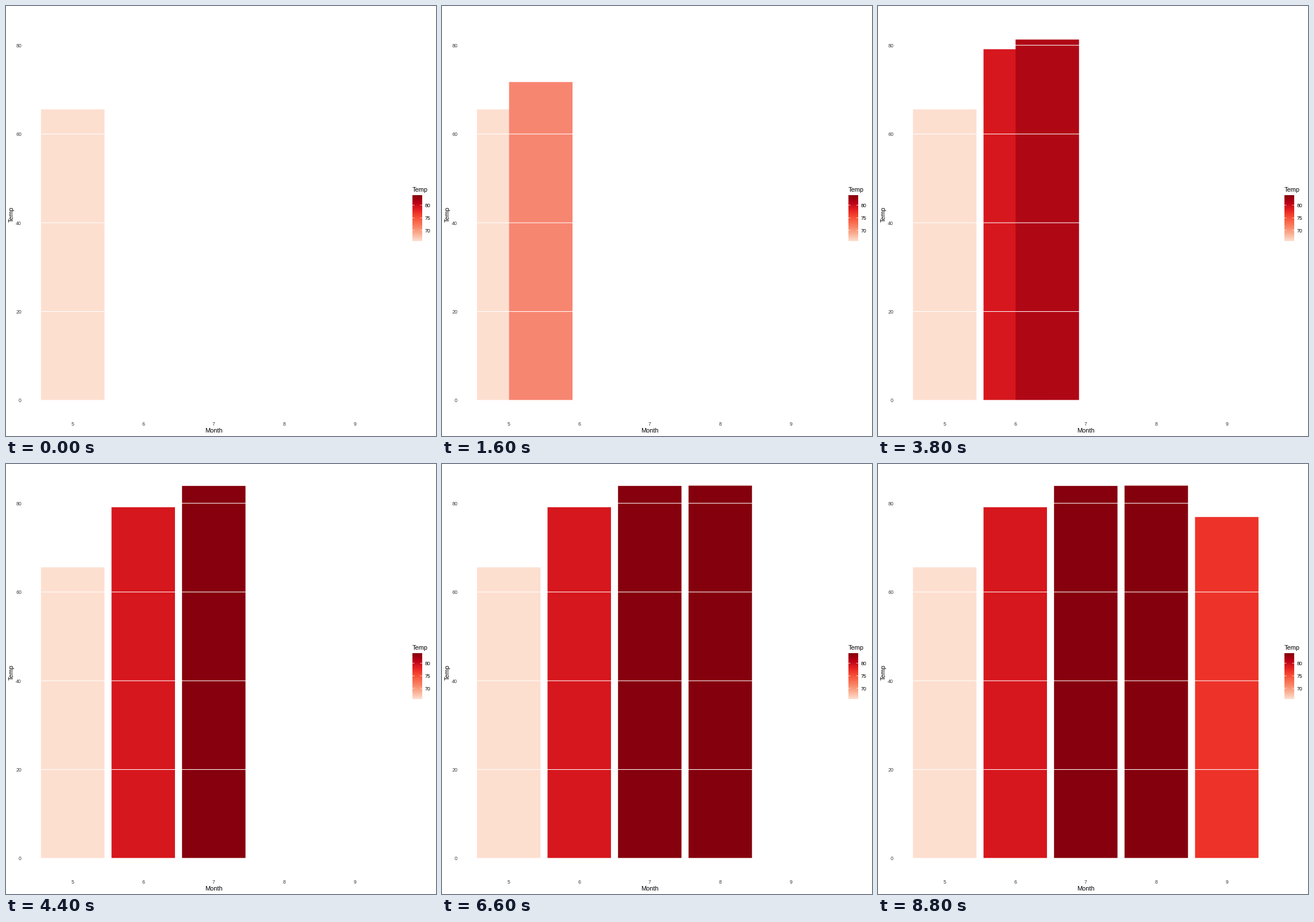
Animation of 748 by 748 pixels, one loop 10000 ms. Source, as a matplotlib script:

```python
import numpy as np
import matplotlib.pyplot as plt
from matplotlib.animation import FuncAnimation
from matplotlib.patches import Rectangle

SIZE, DPI = 748, 88
PX = 72 / DPI                       # one pixel in points
Y0, Y_UNIT = 685.9, 7.7205          # chart zero line and pixels per degree
X0, X_STEP = 116.1, 122.65          # centre of the first bar and spacing
BAR_W = 0.9 * X_STEP
MOVE, CYCLE = 11, 22                # frames per move, frames per month

months = [5, 6, 7, 8, 9]
temps = np.array([65.548, 79.1, 83.903, 83.968, 76.9])
low, high = temps.min(), temps.max()

REDS = ["fee5d9", "fcbba1", "fc9272", "fb6a4a", "ef3b2c", "cb181d", "99000d"]


# ---- colour: ramp blended in Lab, shown in a gamma 1.8 display space ----

def primaries(*xy):
    """RGB to XYZ matrix for three chromaticities and a D65 white."""
    m = np.array([[x / y, 1, (1 - x - y) / y] for x, y in xy]).T
    return m * np.linalg.solve(m, WHITE)


WHITE = np.array([0.9505, 1.0, 1.089])
SRGB = primaries((0.64, 0.33), (0.30, 0.60), (0.15, 0.06))
DISPLAY = primaries((0.63, 0.34), (0.295, 0.605), (0.155, 0.077))


def hex_to_lab(code):
    c = np.array([int(code[i:i + 2], 16) for i in (0, 2, 4)]) / 255
    lin = np.where(c > 0.04045, ((c + 0.055) / 1.055) ** 2.4, c / 12.92)
    t = SRGB @ lin / WHITE
    f = np.where(t > 0.008856, np.cbrt(t), 7.787 * t + 16 / 116)
    return np.array([116 * f[1] - 16, 500 * (f[0] - f[1]), 200 * (f[1] - f[2])])


def lab_to_display(lab):
    fy = (lab[0] + 16) / 116
    f = np.array([fy + lab[1] / 500, fy, fy - lab[2] / 200])
    xyz = np.where(f > 0.2069, f ** 3, (f - 16 / 116) / 7.787) * WHITE
    lin = np.clip(np.linalg.solve(SRGB, xyz), 0, 1)
    return np.clip(np.linalg.solve(DISPLAY, SRGB @ lin), 0, 1) ** (1 / 1.8)


STOPS = np.array([hex_to_lab(c) for c in REDS])


def ramp(temp):
    pos = (temp - low) / (high - low) * (len(STOPS) - 1)
    return np.array([np.interp(pos, range(len(STOPS)), ch) for ch in STOPS.T])


fills = [ramp(t) for t in temps]

# ---- static parts ----

plt.rcParams["font.family"] = "Liberation Sans"
fig = plt.figure(figsize=(SIZE / DPI, SIZE / DPI), dpi=DPI, facecolor="white")
ax = fig.add_axes([0, 0, 1, 1])
GREY = (60 / 255,) * 3


def label(x, y, text, size=8.8, color="black", ha="center", **kw):
    ax.text(x, y, text, fontsize=size * PX, color=color, ha=ha,
            va="baseline", **kw)


def white_line(x1, x2, y, width):
    ax.plot([x1, x2], [y, y], color="white", lw=width * PX, zorder=5,
            snap=False, solid_capstyle="butt")


for value in range(0, 81, 20):
    y = Y0 - value * Y_UNIT
    white_line(31, 692, y, 1.07)
    label(26.9, y + 3.5, str(value), color=GREY, ha="right")
for i, month in enumerate(months):
    label(X0 + i * X_STEP, 729.8, str(month), color=GREY)
label(361.4, 742, "Month", 11)
label(12.8, 362.4, "Temp", 11, rotation=90, rotation_mode="anchor")

# legend
LEFT, RIGHT, TOP, BOTTOM = 707, 724, 329, 409
label(LEFT, 323, "Temp", 11, ha="left")
shades = [[lab_to_display(ramp(t))] for t in np.linspace(high, low, BOTTOM - TOP)]
ax.imshow(np.array(shades), extent=(LEFT, RIGHT, BOTTOM, TOP), aspect="auto",
          interpolation="nearest")
for value in (80, 75, 70):
    y = TOP + 0.4 + (high - value) / (high - low) * (BOTTOM - TOP)
    white_line(LEFT, LEFT + 3.4, y, 0.7)
    white_line(RIGHT - 3.4, RIGHT, y, 0.7)
    label(728.6, y + 3.6, str(value), ha="left")

ax.set_xlim(0, SIZE)
ax.set_ylim(SIZE, 0)
ax.axis("off")

# ---- bars ----

bars = [ax.add_patch(Rectangle((0, Y0), BAR_W, 0, lw=0, snap=False, zorder=2))
        for _ in months]


def place(bar, pos, temp, lab):
    bar.set_xy((X0 + pos * X_STEP - BAR_W / 2, Y0 - temp * Y_UNIT))
    bar.set_height(temp * Y_UNIT)
    bar.set_facecolor(lab_to_display(lab))


def update(frame):
    """The newest bar slides out of its neighbour, then rests."""
    current, step = divmod(frame + MOVE - 1, CYCLE)
    t = min(step + 1, MOVE) / MOVE
    for i, bar in enumerate(bars):
        bar.set_visible(i <= current)
        k = t if i == current else 1
        prev = max(i - 1, 0)
        place(bar, i - 1 + k,
              temps[prev] + (temps[i] - temps[prev]) * k,
              fills[prev] + (fills[i] - fills[prev]) * k)
    return bars


anim = FuncAnimation(fig, update, frames=100, interval=100, repeat=True,
                     repeat_delay=0, blit=False)
plt.show()
```
